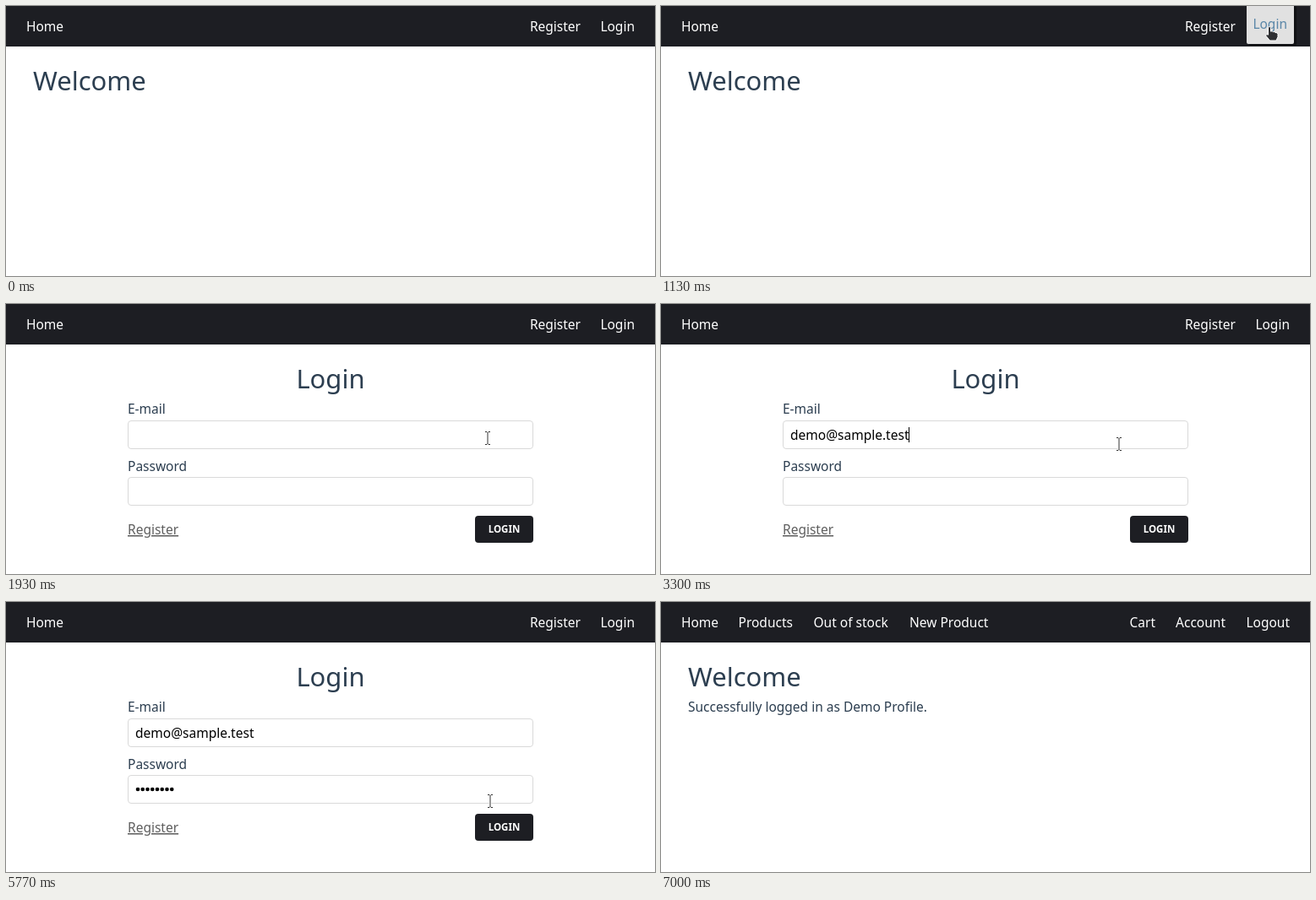
These frames come from a looping animation (768 px wide and 320 px high, 8 s). An HTML page:

```html
<!DOCTYPE html>
<html lang="en">
<head>
<meta charset="utf-8">
<title>Login flow</title>
<style>
  html, body { margin: 0; width: 100%; height: 100%; overflow: hidden; background: #fff; }
  svg { display: block; width: 100vw; height: 100vh; }
  text { font: 15.5px "Noto Sans", "Open Sans", sans-serif; fill: #2c3e50; white-space: pre; }
  .nav text { fill: #fff; }
  .end { text-anchor: end; }
  .title { font-size: 31px; }
  .center { text-anchor: middle; }
  .field { fill: #fff; stroke: #d9d9d9; }
  .value { fill: #000; }
  .link { fill: #5f5f5f; text-decoration: underline; }
  .button { font-size: 11.5px; font-weight: 700; fill: #fff; text-anchor: middle; }
  .pointer path { stroke-linejoin: round; }
</style>
</head>
<body>
<svg viewBox="0 0 768 320" preserveAspectRatio="xMinYMin meet">
  <rect width="768" height="320" fill="#fff"/>
  <g class="nav">
    <rect width="768" height="48" fill="#1d1e23"/>
    <text x="24" y="30">Home</text>
    <g id="guestNav">
      <text class="end" x="680" y="30">Register</text>
      <rect id="loginShadow" x="696" y="0" width="56" height="47" rx="2" fill="#111215"/>
      <g id="loginLink">
        <rect id="loginBack" x="696" y="0" width="56" height="48" rx="2" fill="#e1e1e1"/>
        <text id="loginText" class="end" x="744" y="30">Login</text>
      </g>
    </g>
    <g id="memberNav">
      <text x="91.5" y="30">Products</text>
      <text x="180.5" y="30">Out of stock</text>
      <text x="294" y="30">New Product</text>
      <text class="end" x="585" y="30">Cart</text>
      <text class="end" x="668" y="30">Account</text>
      <text class="end" x="744" y="30">Logout</text>
    </g>
  </g>

  <g id="welcome">
    <text class="title" x="32" y="100">Welcome</text>
    <text id="notice" x="32" y="130">Successfully logged in as Demo Profile.</text>
  </g>

  <g id="form">
    <text class="title center" x="384" y="100">Login</text>
    <text x="144" y="130">E-mail</text>
    <rect class="field" x="144.5" y="138.5" width="479" height="33" rx="3.5"/>
    <text id="email" class="value" x="153" y="161">demo@sample.test</text>
    <text x="144" y="198">Password</text>
    <rect class="field" x="144.5" y="205.5" width="479" height="33" rx="3.5"/>
    <g id="dots"></g>
    <rect id="caret" width="1" height="18" fill="#000"/>
    <text class="link" x="144" y="273">Register</text>
    <rect id="halo" x="554" y="250" width="71" height="34" rx="5" fill="#c4c4c4"/>
    <rect id="button" x="555" y="251" width="69" height="32" rx="4"/>
    <text class="button" x="589.5" y="271">LOGIN</text>
  </g>

  <g id="pointer" class="pointer">
    <path id="hand" fill="#2f3033" stroke="#fff"
      d="M-2.5 1.5Q-1 -.8 .6 1.5V6.2Q2.2 5 3.4 6.7Q5 5.8 6 7.5Q8.6 7 9 9.5V12.5L7 17H-.5L-5 11.5Q-5.6 8.8 -2.5 10.2Z"/>
    <g id="beam" fill="none">
      <path d="M-3 -7.5H3M0 -7.5V7.5M-3 7.5H3" stroke="#fff" stroke-width="3"/>
      <path d="M-3 -7.5H-1L0 -6.5L1 -7.5H3M0 -6.5V6.5M-3 7.5H-1L0 6.5L1 7.5H3" stroke="#333"/>
    </g>
    <path id="arrow" d="M0 0V15L3.6 11.8L6 17L8.4 16L6 10.8H11Z" fill="#2f3033" stroke="#fff"/>
  </g>
</svg>
<script>
const LOOP = 8000;
const FORM_OPENS = 1500, LOGGED_IN = 6430;
const EMAIL_FOCUS = 2300, EMAIL_FILLED = 2630, PASSWORD_FOCUS = 3870;
const keyTimes = [4070, 4230, 4400, 4570, 4670, 4800, 4930, 5070];
const DOT_STEP = 5.75;

// time, x, y of the pointer's hot spot
const route = [
  [870, 738, -20], [1080, 721, 24], [1700, 721, 24], [1930, 570, 159],
  [2230, 542, 166], [5400, 542, 166], [5950, 583, 259], [6470, 583, 259], [6900, 790, 345]
];

const el = id => document.getElementById(id);
const show = (id, on) => el(id).setAttribute("visibility", on ? "inherit" : "hidden");
const set = (id, attrs) => {
  for (const name in attrs) el(id).setAttribute(name, attrs[name]);
};
const ramp = (t, from, to) => Math.min(1, Math.max(0, (t - from) / (to - from)));
const smooth = p => p * p * (3 - 2 * p);
const mix = (a, b, p) => a + (b - a) * p;
const mixColor = (a, b, p) => `rgb(${a.map((v, i) => Math.round(mix(v, b[i], p)))})`;
const inside = ([x, y], left, top, right, bottom) =>
  x >= left && x <= right && y >= top && y <= bottom;

keyTimes.forEach((_, i) => {
  const dot = document.createElementNS("http://www.w3.org/2000/svg", "circle");
  dot.setAttribute("cx", 156 + i * DOT_STEP);
  dot.setAttribute("cy", 222);
  dot.setAttribute("r", 2.3);
  el("dots").append(dot);
});

function pointerAt(t) {
  const next = route.findIndex(stop => stop[0] > t);
  if (next < 1) return null;
  const [t0, x0, y0] = route[next - 1], [t1, x1, y1] = route[next];
  const p = smooth(ramp(t, t0, t1));
  return [mix(x0, x1, p), mix(y0, y1, p)];
}

function drawPointer(t, formOpen) {
  const at = pointerAt(t);
  show("pointer", at);
  if (!at) return;
  const overLink = inside(at, 696, -30, 752, 48) || formOpen && inside(at, 555, 251, 624, 283);
  const overField = formOpen &&
    (inside(at, 144, 138, 624, 172) || inside(at, 144, 205, 624, 239));
  show("hand", overLink);
  show("beam", overField);
  show("arrow", !overLink && !overField);
  const [x, y] = at.map(Math.round);
  set("pointer", { transform: `translate(${x} ${y})` });
}

function drawLoginLink(t) {
  const hover = smooth(ramp(t, 960, 1110)) * (1 - smooth(ramp(t, 1750, 1900)));
  set("loginLink", { transform: `translate(${-3 * hover} ${-3 * hover})` });
  set("loginBack", { opacity: hover });
  set("loginShadow", { opacity: hover });
  el("loginText").style.fill = mixColor([255, 255, 255], [91, 135, 168], hover);
}

function drawForm(t) {
  const typed = keyTimes.filter(time => time <= t).length;
  const filled = t >= EMAIL_FILLED;
  const inPassword = t >= PASSWORD_FOCUS;
  show("email", filled);
  [...el("dots").children].forEach((dot, i) =>
    dot.setAttribute("visibility", i < typed ? "inherit" : "hidden"));

  const caretOn = inPassword ? t < 5570 : t >= EMAIL_FOCUS && (t < 2800 || t >= 3300);
  show("caret", caretOn);
  set("caret", inPassword
    ? { x: Math.floor(153 + typed * DOT_STEP), y: 213 }
    : { x: filled ? 293 : 153, y: 146 });

  const hover = smooth(ramp(t, 5780, 5950));
  set("button", { fill: mixColor([29, 30, 35], [119, 119, 119], hover) });
  set("halo", { opacity: hover });
}

function draw(t) {
  const member = t >= LOGGED_IN;
  const formOpen = t >= FORM_OPENS && !member;
  show("guestNav", !member);
  show("memberNav", member);
  show("welcome", !formOpen);
  show("notice", member);
  show("form", formOpen);
  drawLoginLink(t);
  if (formOpen) drawForm(t);
  // Hidden children need the form's state once it closes.
  else ["email", "caret", "dots"].forEach(id => show(id, false));
  if (formOpen) show("dots", true);
  drawPointer(t, formOpen);
}

const start = performance.now();
function tick() {
  draw((performance.now() - start) % LOOP);
  requestAnimationFrame(tick);
}
tick();
</script>
</body>
</html>
```
